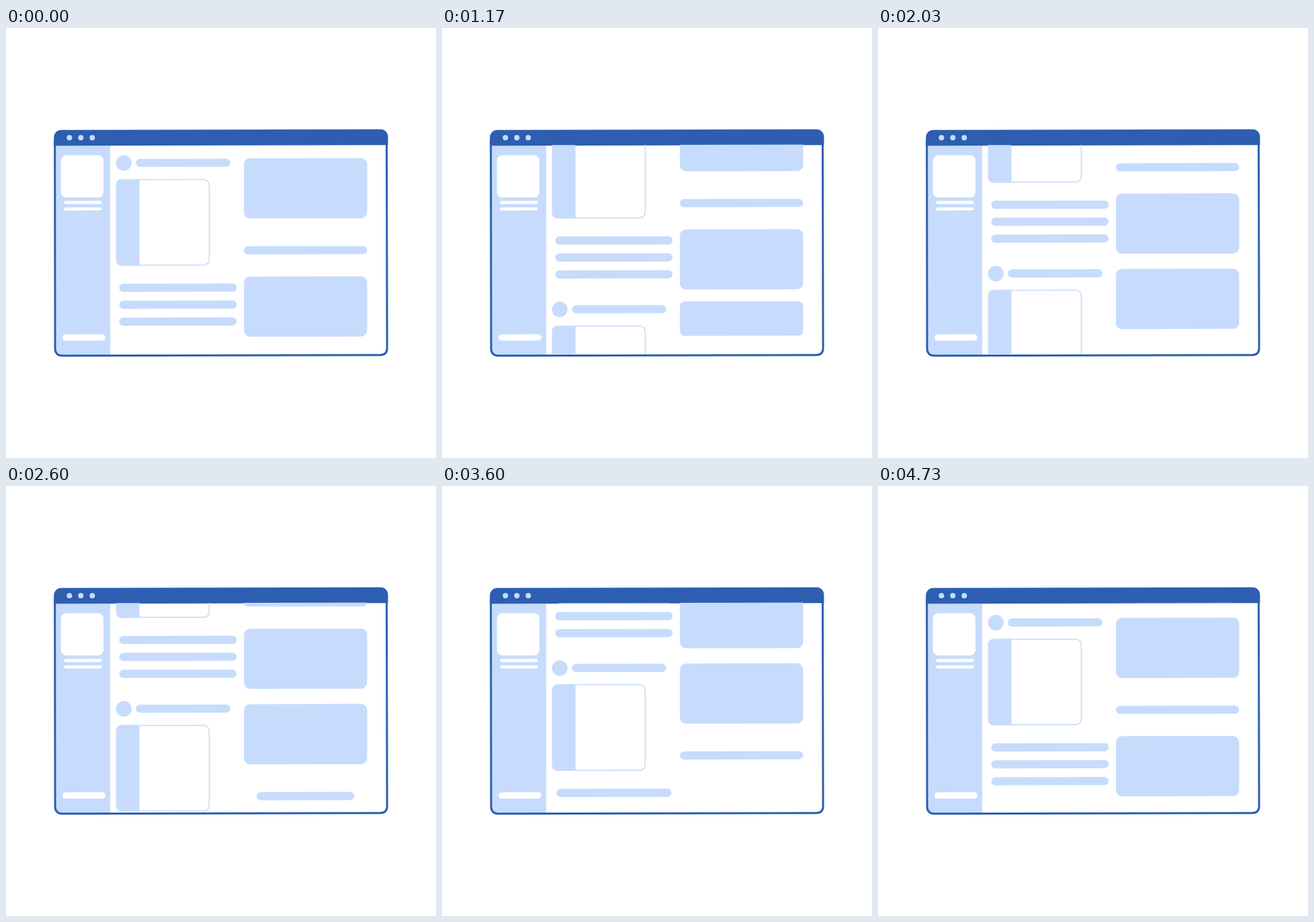
Write an HTML page with a canvas that moves like this. It is 640 px wide and 640 px high and loops after 4.76 s.

```html
<!DOCTYPE html>
<html lang="en">
<head>
<meta charset="utf-8">
<title>Scrolling page</title>
<style>
  html, body { margin: 0; width: 100%; height: 100%; overflow: hidden; background: #fff; }
  canvas { display: block; width: 640px; height: 640px; }
</style>
</head>
<body>
<canvas width="640" height="640"></canvas>
<script>
const ctx = document.querySelector('canvas').getContext('2d');
const DARK = '#2d5eb1', LIGHT = '#c7dcfc', WHITE = '#fff';
const LOOP = 4760, STEP = 40, STEPS = LOOP / STEP;
const PAGE = 288.2, SPEED = PAGE / STEPS;
const ENTRY = 472.5; // height on the stage where a bar starts to widen

const ease = p => (1 - Math.cos(Math.PI * Math.min(1, Math.max(0, p)))) / 2;

function rect(x, y, w, h, r, color = LIGHT) {
  ctx.fillStyle = color;
  ctx.beginPath();
  ctx.roundRect(x, y, w, h, r);
  ctx.fill();
}

function dot(x, y, r) {
  ctx.fillStyle = LIGHT;
  ctx.beginPath();
  ctx.arc(x, y, r, 0, 7);
  ctx.fill();
}

// A bar widens from its middle as soon as it scrolls into view.
function bar(step, x, y, w) {
  const start = (y + PAGE - ENTRY) / SPEED;
  const width = w * ease((step - start) / 10);
  rect(x + (w - width) / 2, y, width, 12.2, 6.1);
}

// A box grows downwards from the height of its anchor.
function box(step, y, anchor, start) {
  const grow = ease((step - start) / 20);
  rect(354.1, anchor + (y - anchor) * grow, 183.4, 89.6 * grow, 9 * Math.sqrt(grow));
}

function card(x, y, w, h) {
  rect(x, y, w / 4, h, [8, 0, 0, 8]);
  ctx.strokeStyle = LIGHT;
  ctx.lineWidth = 1.6;
  ctx.beginPath();
  ctx.roundRect(x + 0.8, y + 0.8, w - 1.6, h - 1.6, 8);
  ctx.stroke();
}

function drawPage(step) {
  const pop = 1.2 * ease((step - 4) / 7.5) - 0.2 * ease((step - 11.5) / 4);
  dot(175.3, 200.6, 11.6 * pop);
  bar(step, 193.3, 194.4, 140.5);
  card(163.8, 224.7, 139.5, 128.8);
  for (let i = 0; i < 3; i++) bar(step, 168.5, 380.3 + 25.2 * i, 174.8);

  box(step, 194, 182.7, 18.1);
  bar(step, 354.1, 324.8, 183.4);
  box(step, 370, 344.1, 92);
}

function drawSidebar() {
  rect(74, 174, 81.2, 313, [0, 0, 0, 9]);
  rect(81.8, 188.9, 63.2, 63, 8, WHITE);
  for (const y of [257, 266.6]) rect(86.3, y, 56.3, 4.6, 2.3, WHITE);
  rect(84, 455.5, 64, 9.4, 4.7, WHITE);
}

function drawWindow() {
  rect(71.3, 151.2, 497.2, 23.5, [11, 11, 0, 0], DARK);
  for (let i = 0; i < 3; i++) dot(94.4 + 17 * i, 162.8, 4);
  ctx.strokeStyle = DARK;
  ctx.lineWidth = 3;
  ctx.beginPath();
  ctx.moveTo(72.7, 165);
  ctx.lineTo(73.1, 477);
  ctx.quadraticCurveTo(73.5, 487.2, 84, 487.2);
  ctx.lineTo(557, 487.2);
  ctx.quadraticCurveTo(567.2, 487, 567.2, 477);
  ctx.lineTo(566.6, 165);
  ctx.stroke();
}

function frame(now) {
  const step = Math.min(STEPS - 1, Math.floor((now % LOOP + STEP / 4) / STEP));
  rect(0, 0, 640, 640, 0, WHITE);
  ctx.save();
  // A faint slope gives the hand-drawn look.
  ctx.transform(1, -0.002, 0, 1, 0, 0.64);
  drawSidebar();
  drawWindow();

  ctx.beginPath();
  ctx.rect(156, 174, 409, 311.2);
  ctx.clip();
  ctx.translate(0, -SPEED * step);
  drawPage(STEPS);
  ctx.translate(0, PAGE);
  drawPage(step);
  ctx.restore();
}

const begin = performance.now();
function tick() {
  frame(performance.now() - begin);
  requestAnimationFrame(tick);
}
tick();
</script>
</body>
</html>
```
